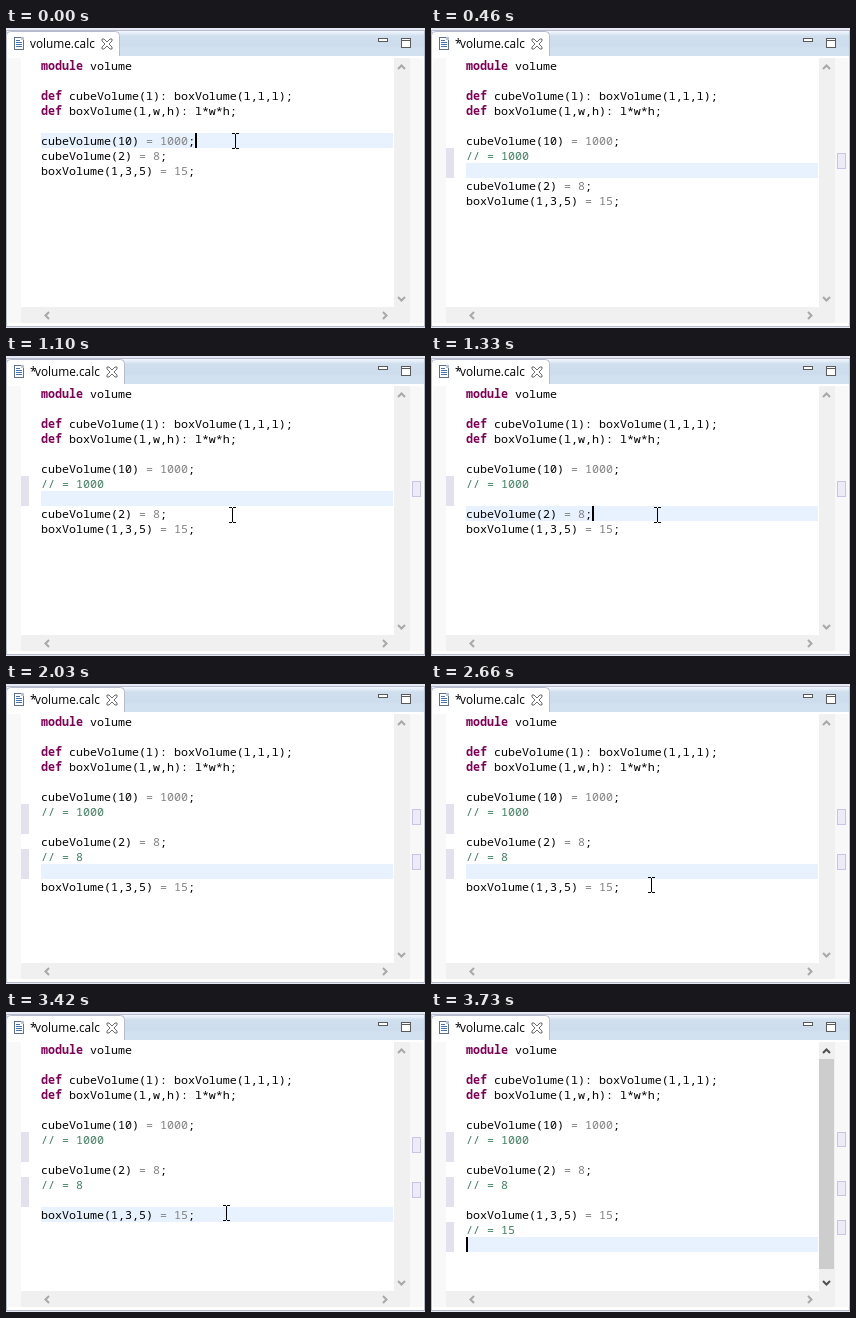
These frames come from a looping animation (419 by 300 pixels, 4280 ms). An HTML page with a canvas:

```html
<!DOCTYPE html>
<html lang="en">
<head>
<meta charset="utf-8">
<title>Calculator editor</title>
<style>
  html, body { margin: 0; width: 100%; height: 100%; overflow: hidden; background: #fff; }
  canvas { display: block; }
</style>
</head>
<body>
<canvas id="stage" width="419" height="300"></canvas>
<script>
const ctx = document.getElementById('stage').getContext('2d');
const LOOP = 4280, LEFT = 35, TOP = 30, ROW = 15, COL = 7;
const INSERTS = [460, 2030, 3730];
const CODE = '11.667px "Noto Sans Mono", "DejaVu Sans Mono", monospace';
const LABEL = '11.8px "Open Sans", "Noto Sans", sans-serif';
const KEYWORD = '#7f0055', MINING = '#808080', COMMENT = '#3f7f5f';
const CALLS = [['cubeVolume(10)', 1000], ['cubeVolume(2)', 8], ['boxVolume(1,3,5)', 15]];
const MARKERS = [[], [125], [125, 170], [120, 169, 208]];
const CARET_ON = [[0, 230], [540, 1100], [1330, 1880], [2110, 2660], [2890, 3420], [3730, LOOP]];

const within = (t, from, to) => t >= from && t < to;

function rect(x, y, w, h, color) {
  ctx.fillStyle = color;
  ctx.fillRect(x, y, w, h);
}

function frame(x, y, w, h, color, fill) {
  rect(x, y, w, h, color);
  rect(x + 1, y + 1, w - 2, h - 2, fill);
}

function line(color, width, ...points) {
  ctx.beginPath();
  points.forEach(([x, y]) => ctx.lineTo(x, y));
  ctx.strokeStyle = color;
  ctx.lineWidth = width;
  ctx.stroke();
}

function text(str, x, y, color, font) {
  ctx.font = font;
  ctx.fillStyle = color;
  ctx.fillText(str, x, y);
}

// Each part is [string, color, bold]; parts follow each other on the column grid.
function codeLine(row, parts) {
  let col = 0;
  for (const [str, color = '#000', bold] of parts) {
    text(str, LEFT + col * COL, TOP + row * ROW + 12, color, (bold ? 'bold ' : '') + CODE);
    col += str.length;
  }
}

function vGradient(y0, y1, stops) {
  const g = ctx.createLinearGradient(0, y0, 0, y1);
  stops.forEach(([at, color]) => g.addColorStop(at, color));
  return g;
}

function drawTab(dirty) {
  const shift = dirty ? 5 : 0, right = 113.5 + shift;
  ctx.beginPath();
  ctx.moveTo(0.5, 30);
  ctx.lineTo(0.5, 7.5);
  ctx.quadraticCurveTo(0.5, 3.5, 4.5, 3.5);
  ctx.lineTo(right - 4, 3.5);
  ctx.quadraticCurveTo(right, 3.5, right, 7.5);
  ctx.lineTo(right, 28);
  ctx.lineTo(right, 30);
  ctx.fillStyle = '#fff';
  ctx.fill();
  ctx.strokeStyle = '#b6bccc';
  ctx.lineWidth = 1;
  ctx.stroke();
  rect(1, 28, 417, 2, '#fff');

  frame(8, 9, 10, 13, '#5f7088', '#fff');
  rect(15, 9, 3, 3, '#b9c4d6');
  for (let y = 12; y < 20; y += 2) rect(10, y, y < 13 ? 4 : 6, 1, '#3f74ad');

  if (dirty) text('*', 24, 20, '#000', LABEL);
  text('volume.calc', 24 + shift, 20, '#000', LABEL);

  const x = 101 + shift, y = 16;
  ctx.beginPath();
  [[-5, -5], [-3, -5], [0, -2], [3, -5], [5, -5], [5, -3], [2, 0], [5, 3], [5, 5], [3, 5],
   [0, 2], [-3, 5], [-5, 5], [-5, 3], [-2, 0], [-5, -3]]
    .forEach(([dx, dy]) => ctx.lineTo(x + dx, y + dy));
  ctx.closePath();
  ctx.fillStyle = '#fff';
  ctx.fill();
  ctx.strokeStyle = '#6b6b6b';
  ctx.stroke();
}

function drawWindow(dirty) {
  rect(0, 0, 419, 300, '#e6e8f4');
  rect(0, 2, 419, 297, '#b6bccc');
  rect(1, 3, 417, 25, vGradient(3, 28, [
    [0, '#f3f9ff'], [0.2, '#d0dfee'], [0.45, '#cedded'], [0.6, '#cedded'], [0.7, '#d2e1f0'], [1, '#d2e1f0']
  ]));
  rect(1, 28, 417, 270, '#fff');
  drawTab(dirty);
  frame(372, 10, 10, 4, '#5a5a5a', '#fff');
  frame(395, 10, 10, 10, '#5a5a5a', '#fff');
  rect(395, 12, 10, 1, '#5a5a5a');
}

function drawScrollbars(scrollable) {
  rect(2, 30, 13, 265, '#f8f8f8');
  rect(404, 30, 13, 265, '#f8f8f8');
  rect(388, 30, 16, 249, '#f0f0f0');
  rect(15, 279, 389, 16, '#f0f0f0');
  if (scrollable) rect(388, 47, 15, 210, '#cdcdcd');
  const v = scrollable ? '#505050' : '#a8a8a8', h = '#a8a8a8';
  line(v, 2, [392, 41], [395.5, 37.5], [399, 41]);
  line(v, 2, [392, 269], [395.5, 272.5], [399, 269]);
  line(h, 2, [43, 284], [39.5, 287.5], [43, 291]);
  line(h, 2, [377, 284], [380.5, 287.5], [377, 291]);
}

function drawCode(inserted) {
  codeLine(0, [['module', KEYWORD, true], [' volume']]);
  codeLine(2, [['def', KEYWORD, true], [' cubeVolume(l): boxVolume(l,l,l);']]);
  codeLine(3, [['def', KEYWORD, true], [' boxVolume(l,w,h): l*w*h;']]);
  let row = 5;
  CALLS.forEach(([call, value], i) => {
    codeLine(row++, [[call], [' = ' + value, MINING], [';']]);
    if (i < inserted) {
      rect(15, TOP + row * ROW, 8, 2 * ROW, '#e4e1ef');
      codeLine(row, [['// = ' + value, COMMENT]]);
      row += 2;
    }
  });
  const height = inserted === 3 ? 15 : 16;
  MARKERS[inserted].forEach(y => frame(406, y, 9, height, '#c9c4e4', '#edebf8'));
}

// Row and column of the caret.
function caretAt(t) {
  if (t < 460) return [5, 22];
  if (t < 1330) return [7, 0];
  if (t < 2030) return [8, 18];
  if (t < 2890) return [10, 0];
  if (t < 3730) return [11, 22];
  return [13, 0];
}

// The pointer is sampled in discrete steps while it moves.
function pointerAt(t) {
  const glide = (start, steps) => {
    const p = Math.max(0, Math.min(steps, Math.floor((t - start) / 77) + 1)) / steps;
    return p * p * (3 - 2 * p);
  };
  const a = glide(780, 4), b = glide(2430, 3);
  return [Math.round(229 - 3 * a - 6 * b), Math.round(113 + 46 * a + 42 * b)];
}

function drawPointer([x, y]) {
  rect(x, y - 7, 1, 14, '#000');
  for (const dy of [-8, 7]) {
    rect(x - 3, y + dy, 3, 1, '#000');
    rect(x + 1, y + dy, 3, 1, '#000');
  }
}

function draw(t) {
  const inserted = INSERTS.filter(at => t >= at).length;
  const [row, col] = caretAt(t);
  const y = TOP + row * ROW;
  drawWindow(inserted > 0);
  drawScrollbars(inserted === 3);
  rect(LEFT, y, 352, ROW, '#e8f2fe');
  drawCode(inserted);
  if (CARET_ON.some(([from, to]) => within(t, from, to))) rect(LEFT + col * COL, y, 2, ROW, '#000');
  const hidden = within(t, 460, 540) || within(t, 2030, 2110) || t >= 3730;
  if (!hidden) drawPointer(pointerAt(t));
}

const start = performance.now();
function tick() {
  draw((performance.now() - start) % LOOP);
  requestAnimationFrame(tick);
}
tick();
</script>
</body>
</html>
```
